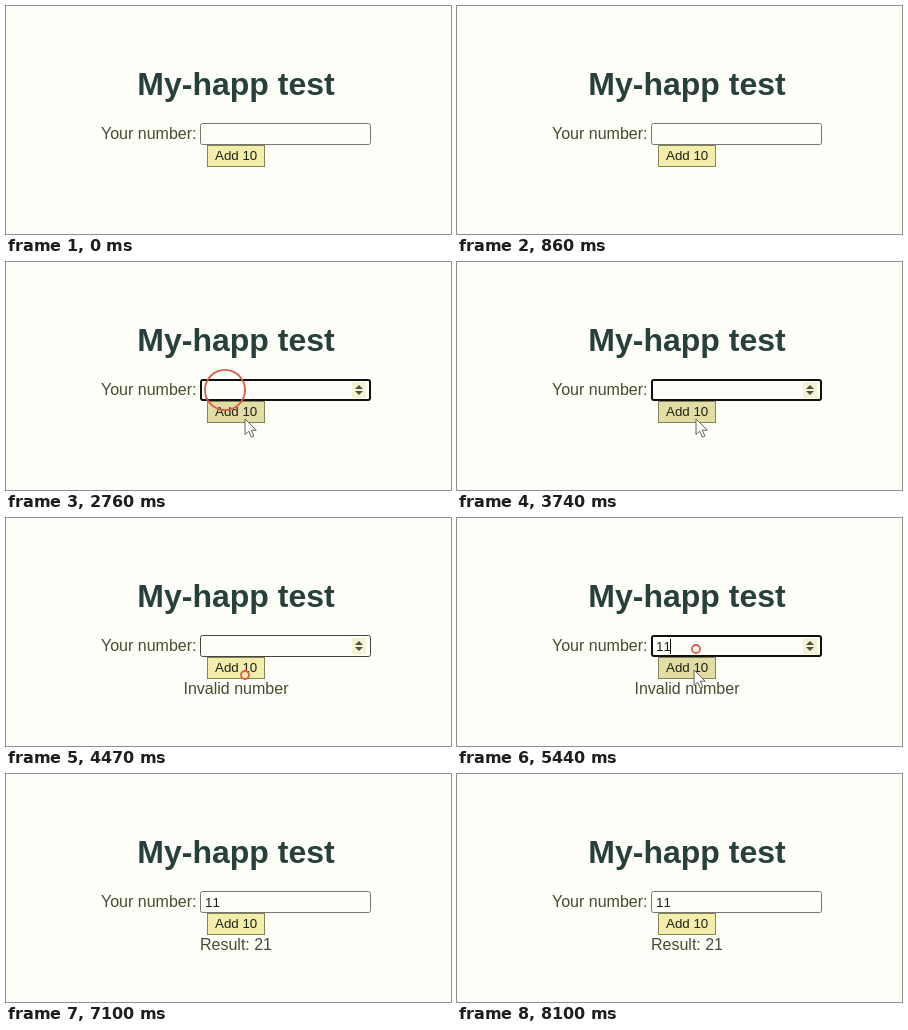
These frames come from a looping animation (445x228 px, 8160 ms). An HTML page:

```html
<!DOCTYPE html>
<html lang="en">
<head>
<meta charset="utf-8">
<title>My-happ test</title>
<style>
html, body { margin: 0; width: 100%; height: 100%; overflow: hidden; background: #fefef9; }
svg { display: block; font: 16px "Liberation Sans", Arial, sans-serif; fill: #434d30; }
.small { font-size: 13.333px; font-kerning: none; fill: #1c2014; }
</style>
</head>
<body>
<svg width="445" height="228" viewBox="0 0 445 228">
  <text x="230" y="89" text-anchor="middle" font-size="32" font-weight="bold" fill="#28403b">My-happ test</text>
  <text x="95" y="133">Your number:</text>
  <rect id="field" rx="2" fill="#fffffa"/>
  <g id="spinner">
    <rect x="346" y="120" width="14" height="16" fill="#f3f2d2"/>
    <path d="M349 127l4-4 4 4zm0 2h8l-4 4z" fill="#50503c"/>
  </g>
  <text id="value" class="small" x="199" y="133"></text>
  <path id="caret" stroke="#111" d="M213.5 121v15"/>
  <rect id="button" x="201.5" y="139.5" width="57" height="21" stroke="#85835a"/>
  <text class="small" x="209" y="154">Add 10</text>
  <text id="message" x="230" y="176" text-anchor="middle"></text>
  <circle id="ring" fill="none" stroke="#dc5a48" stroke-width="1.8"/>
  <path id="arrow" d="M0 0v15.500l3.700-3.300 2.600 6 2.600-1.100-2.600-5.900h5z" fill="#fff" stroke="#626258"/>
</svg>
<script>
const LOOP = 8160, RING = 290, KEY_GAP = 100;
const ENTER = 900, FOCUS = 2500, INVALID = 4430, TYPE = 5150, RESULT = 5945;
const FIELD = { x: 194, y: 117, w: 171, h: 22 };
const BUTTON = { x: 201, y: 139, w: 58, h: 22 };

// Places where the pointer rests; it heads for the next one at `leave`
const stops = [
  { x: -12, y: 136, leave: ENTER },
  { x: 219, y: 128, leave: 2590, press: FOCUS },
  { x: 239, y: 157, leave: 4620, press: INVALID },
  { x: 239, y: 131, leave: 5300, press: 5400 },
  { x: 237, y: 152, leave: 5700 },
  { x: 234, y: 149, leave: 6380, press: RESULT },
  { x: 447, y: 182, leave: LOOP }
];

const $ = id => document.getElementById(id);
const set = (id, attrs) => {
  for (const k in attrs) $(id).setAttribute(k, attrs[k]);
};
const show = (id, on) => set(id, { visibility: on ? 'visible' : 'hidden' });
const within = (t, a, b) => t >= a && t < b;
const inside = (p, box) => within(p.x, box.x, box.x + box.w) && within(p.y, box.y, box.y + box.h);

function pointer(t) {
  const i = stops.findIndex(s => t < s.leave);
  if (i < 1) return stops[0];
  const a = stops[i - 1], b = stops[i];
  const dx = b.x - a.x, dy = b.y - a.y;
  const p = Math.min(1, (t - a.leave) / (100 + 1.2 * Math.hypot(dx, dy)));
  const ease = p * p * (3 - 2 * p);
  return { x: a.x + dx * ease, y: a.y + dy * ease, pressed: t >= b.press };
}

function draw(t) {
  const p = pointer(t);
  const hover = inside(p, BUTTON) && !p.pressed;
  const focus = within(t, FOCUS, INVALID) || within(t, TYPE - 200, RESULT);
  const active = within(t, ENTER, RESULT) && (inside(p, FIELD) || t > FOCUS);
  const line = focus ? 2 : 1;
  set('field', {
    x: FIELD.x + line / 2, y: FIELD.y + line / 2,
    width: FIELD.w - line, height: FIELD.h - line,
    stroke: focus ? '#101010' : active ? '#45453e' : '#777770', 'stroke-width': line
  });
  show('spinner', active);
  $('value').textContent = '11'.slice(0, Math.max(0, Math.ceil((t - TYPE) / KEY_GAP)));
  show('caret', within(t, TYPE + KEY_GAP, RESULT));
  $('message').textContent = t < INVALID ? '' : t < RESULT ? 'Invalid number' : 'Result: 21';
  set('button', { fill: hover ? '#e2dda2' : '#f3eeac' });

  show('arrow', !p.pressed && !inside(p, FIELD));
  set('arrow', { transform: `translate(${p.x} ${p.y})` });

  const click = stops.find(s => within(t, s.press, s.press + RING));
  show('ring', click);
  if (click) set('ring', { cx: click.x, cy: click.y, r: 1 + (t - click.press) * 0.073 });
}

const start = performance.now();
function tick() {
  draw((performance.now() - start) % LOOP);
  requestAnimationFrame(tick);
}
tick();
</script>
</body>
</html>
```
